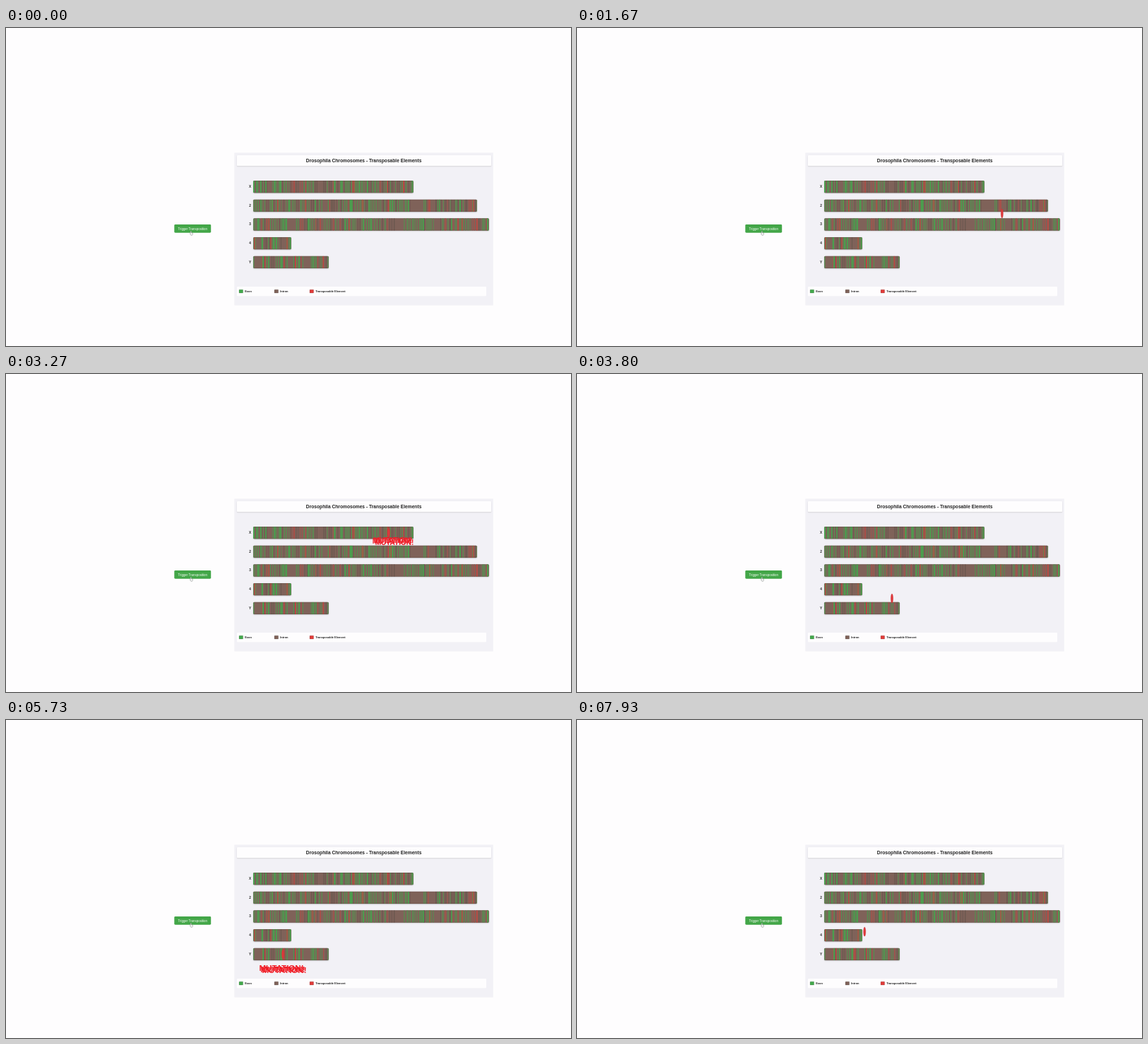
These frames come from a looping animation (800x450 px, 8000 ms). An HTML page with a canvas:

```html
<!DOCTYPE html>
<html lang="en">
<head>
<meta charset="utf-8">
<title>Transposable Elements</title>
<style>
  html, body { margin: 0; width: 100%; height: 100%; overflow: hidden; background: #fefdfe; }
  canvas { display: block; }
</style>
</head>
<body>
<canvas id="stage" width="800" height="450"></canvas>
<script>
const ctx = document.getElementById('stage').getContext('2d');
const LOOP = 8000;
const TEXT_TIME = 450;
const EXON = '#43a94c', INTRON = '#7f6259', ELEMENT = '#e03c3a';
const BAR_X = 350, BAR_H = 17.3;
const barTop = row => 216 + row * 26.67;
const barMid = row => barTop(row) + BAR_H / 2;

// exons and elements: prominent stripes; gaps: long introns as [from, to]
const chromosomes = [
  { name: 'X', end: 577, exons: [351, 355, 361, 368, 380, 388, 465, 475, 500, 512, 575.6],
    elements: [408, 491, 493, 540, 563], gaps: [[371, 377], [443, 449]] },
  { name: '2', end: 667, exons: [361, 377, 401, 438, 488, 490, 514, 544, 547, 570, 614, 643],
    elements: [385, 424, 505, 662], gaps: [[448, 455], [573, 591], [599, 607]] },
  { name: '3', end: 684, exons: [357, 392, 397, 428, 480, 506, 517, 591, 631, 682],
    elements: [372, 486, 646, 667], gaps: [[399, 411], [443, 449], [551, 563], [606, 615]] },
  { name: '4', end: 404, exons: [363, 379, 383, 402.4],
    elements: [352, 375, 398], gaps: [[354, 362], [391, 396]] },
  { name: 'Y', end: 457, exons: [364, 372, 390, 415, 435],
    elements: [367, 394, 410], gaps: [[352, 361], [399, 406], [421, 431]] }
];

// from / to: [x, row]
const jumps = [
  { start: 70,   flight: 500, from: [563, 0], to: [600, 2] },
  { start: 1470, flight: 500, from: [640, 2], to: [545, 1] },
  { start: 2600, flight: 500, from: [600, 1], to: [542, 0], textShift: 6 },
  { start: 3700, flight: 500, from: [449, 4], to: [434, 2] },
  { start: 4930, flight: 500, from: [541, 1], to: [392, 4] },
  { start: 6330, flight: 310, from: [410, 4], to: [372, 3], textShift: 6 },
  { start: 7430, flight: 570, from: [445, 2], to: [402, 3] }
];
const clicks = [1470, 4070, 6330];

function randomFrom(seed) {
  return () => (seed = (seed * 16807) % 2147483647) / 2147483647;
}

function box(x, y, w, h, color, radius = 0) {
  ctx.fillStyle = color;
  ctx.beginPath();
  ctx.roundRect(x, y, w, h, radius);
  ctx.fill();
}

function label(text, x, y, size, color = '#202020', weight = 'bold', align = 'left') {
  ctx.font = `${weight} ${size}px "Liberation Sans", Arial, sans-serif`;
  ctx.textAlign = align;
  ctx.fillStyle = color;
  ctx.fillText(text, x, y);
}

function shadowed(draw, blur, color) {
  ctx.save();
  ctx.shadowColor = color;
  ctx.shadowBlur = blur;
  ctx.shadowOffsetY = .7;
  draw();
  ctx.restore();
}

function drawChromosome({ name, end, exons, elements, gaps }, row, t) {
  const y = barTop(row), random = randomFrom(811 + row * 977);
  const stripe = (x, w, color) => box(x - w / 2, y, w, BAR_H, color);
  label(name, 345.5, barMid(row) + 1.5, 4.67, '#202020', 'bold', 'center');
  ctx.save();
  shadowed(() => box(BAR_X, y, end - BAR_X, BAR_H, INTRON, 1.7), 1.5, 'rgba(0,0,0,.25)');
  ctx.beginPath();
  ctx.roundRect(BAR_X, y, end - BAR_X, BAR_H, 1.7);
  ctx.clip();
  for (let x = BAR_X + .8; x < end; x += 1.3 + random() * 2.5) {
    const kind = random(), width = .6 + random() * .7;
    if (gaps.some(([a, b]) => x > a && x < b)) continue;
    stripe(x, width, kind < .62 ? '#4f9650' : kind < .72 ? '#aa5149' : '#69584f');
  }
  exons.forEach(x => stripe(x, 1.5, EXON));
  elements.forEach(x => stripe(x, 1.2, '#c9433f'));
  for (const { start, flight, from, to } of jumps) {
    if (from[1] === row && t < start) stripe(from[0], 1.1, '#c9433f');
    if (to[1] === row && t >= start + flight) stripe(to[0], 1.1, '#c9433f');
  }
  ctx.fillStyle = 'rgba(55,45,40,.22)';
  ctx.fillRect(BAR_X, y, end - BAR_X, .7);
  ctx.fillRect(BAR_X, y + BAR_H - .7, end - BAR_X, .7);
  ctx.restore();
}

function drawMutation(x, y, p, t) {
  const size = 8 + 5.3 * p;
  ctx.globalAlpha = Math.min(1, .82 + p, (1 - p) * 4);
  for (let i = -1; i <= 1; i++) {
    const wobble = Math.sin(t / 35 + i * 2);
    label('MUTATION!', x + i * 2, y + 32 * p + size * .36 + wobble * 1.4, size, '#f01f28', 'bold', 'center');
  }
  ctx.globalAlpha = 1;
}

function drawJump({ start, flight, from, to, textShift = 0 }, t) {
  const age = t - start;
  if (age < 0 || age > flight + TEXT_TIME) return;
  const p = Math.min(1, age / flight);
  const x = from[0] + (to[0] - from[0]) * p;
  const y = barMid(from[1]) + (barMid(to[1]) - barMid(from[1])) * p - 5 * Math.sin(Math.PI * p);
  ctx.beginPath();
  ctx.ellipse(x, y, 1.6, 6.5, 0, 0, Math.PI * 2);
  ctx.fillStyle = '#e2363a';
  ctx.fill();
  ctx.lineWidth = .35;
  ctx.strokeStyle = '#b63a38';
  ctx.stroke();
  if (age >= flight) drawMutation(to[0] + textShift, barMid(to[1]), (age - flight) / TEXT_TIME, t);
}

function drawButton(t) {
  const pressed = clicks.some(c => t >= c && t < c + 130);
  box(238.3, 278, 51.9, 11.7, pressed ? '#3c9a41' : '#43a648', 1.4);
  label('Trigger Transposition', 264.2, 285.5, 4.44, '#f4fbf4', 'normal', 'center');
  // hand pointer
  ctx.save();
  ctx.translate(260.5, 287.2);
  const hand = new Path2D('M.8 .6Q1.5 0 2 .7V2.5L3.8 3V4.7L3.2 6H1.3L0 3.7L.8 3.5Z');
  ctx.fillStyle = '#fff';
  ctx.fill(hand);
  ctx.lineWidth = .5;
  ctx.strokeStyle = '#737876';
  ctx.stroke(hand);
  ctx.restore();
}

function drawPanel() {
  box(323.3, 176.4, 366.5, 216, '#f2f1f6');
  shadowed(() => box(327, 180, 360, 15.3, '#fefdfe', 1), 1.5, 'rgba(0,0,0,.16)');
  label('Drosophila Chromosomes - Transposable Elements', 506.6, 189.5, 6.667, '#222', 'bold', 'center');
  box(327, 366, 353, 13.2, '#fefdfe', 1);
  [['Exon', EXON], ['Intron', INTRON], ['Transposable Element', ELEMENT]].forEach(([text, color], i) => {
    const x = 330 + i * 50;
    box(x, 370.3, 5.6, 4.7, color, .4);
    ctx.lineWidth = .35;
    ctx.strokeStyle = 'rgba(50,50,50,.5)';
    ctx.stroke();
    label(text, x + 8.2, 373.7, 4);
  });
}

function draw(now) {
  const t = now % LOOP;
  box(0, 0, 800, 450, '#fefdfe');
  drawPanel();
  chromosomes.forEach((c, row) => drawChromosome(c, row, t));
  jumps.forEach(jump => drawJump(jump, t));
  drawButton(t);
  requestAnimationFrame(draw);
}
draw(performance.now());
</script>
</body>
</html>
```
